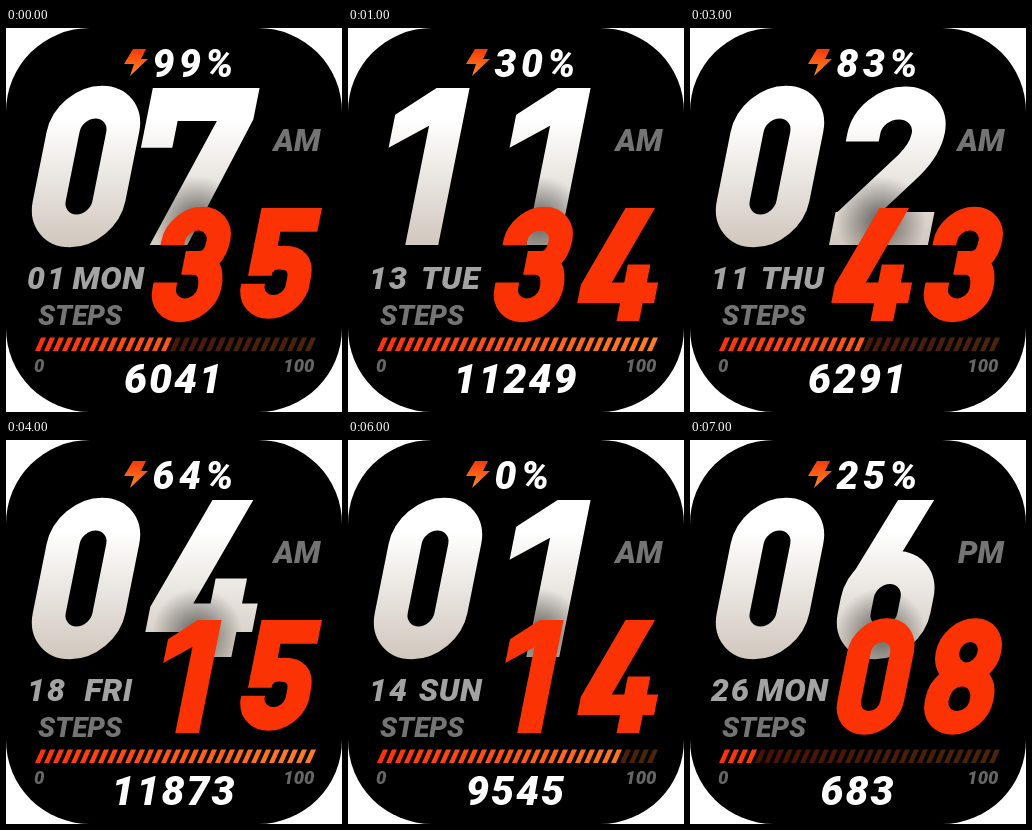
An HTML page that plays this animation: 336x384 px, repeating every 8 s.

```html
<!DOCTYPE html>
<html lang="en">
<head>
<meta charset="utf-8">
<title>Watch face</title>
<style>
  html, body { margin: 0; width: 100%; height: 100%; overflow: hidden; background: #fff; }
  svg { display: block; }
  text { font: italic 900 32px Roboto, "Open Sans", sans-serif; fill: #fff; }
  .mid { text-anchor: middle; }
  .date { fill: #a3a3a3; }
  .label { fill: #747474; }
  .scale { font-size: 18.5px; fill: #666; }
</style>
</head>
<body>
<svg width="336" height="384" viewBox="0 0 336 384">
  <defs>
    <linearGradient id="ivory" gradientUnits="userSpaceOnUse" x1="0" y1="0" x2="0" y2="100">
      <stop offset=".2" stop-color="#fff"/><stop offset="1" stop-color="#d1c8be"/>
    </linearGradient>
    <linearGradient id="flame" x1="0" y1="0" x2="0" y2="1">
      <stop offset="0" stop-color="#f5380c"/><stop offset="1" stop-color="#ff8a24"/>
    </linearGradient>
    <radialGradient id="shade">
      <stop offset=".2" stop-opacity=".45"/><stop offset="1" stop-opacity="0"/>
    </radialGradient>
  </defs>
  <rect width="336" height="384" rx="84"/>
  <path d="M127 21H140L135 31H142L124 48L128 36H118Z" fill="url(#flame)"/>
  <text id="battery" x="146.5" y="48.5" style="font-size:39px;letter-spacing:4.5px"></text>
  <g id="hours"></g>
  <circle cx="191" cy="193" r="45" fill="url(#shade)"/>
  <g id="minutes"></g>
  <text id="half" class="label mid" x="291" y="123" style="font-size:31px"></text>
  <text id="day" class="date" x="21" y="260.5" style="letter-spacing:2px"></text>
  <text id="weekday" class="date mid" x="102.5" y="260.5" style="letter-spacing:.5px"></text>
  <text class="label" x="32" y="296.5" style="font-size:28px">STEPS</text>
  <g id="bar"></g>
  <text class="scale" x="28" y="344">0</text>
  <text class="scale" x="308.5" y="344" text-anchor="end">100</text>
  <text id="steps" class="mid" x="168" y="364.5" style="font-size:41px;letter-spacing:2px"></text>
</svg>
<script>
const $ = id => document.getElementById(id);

// Upright digits, 100 units tall: [stroked centre line, filled part]
const DIGITS = {
  0: ["M10.5 28A19 19 0 0 1 48.5 28V72A19 19 0 0 1 10.5 72Z", ""],
  1: ["", "M25 0H46V100H25V24L2 38V17Z"],
  2: ["M8 34V29A20.5 19.5 0 0 1 49 29Q49 39 41 49L9 86M0 89.5H63", ""],
  3: ["M9 33V29A20 19.5 0 0 1 49 29Q49 48.5 33 48.5H22M33 48.5Q49.5 50 49.5 71A20 19.5 0 0 1 9.5 71V66", ""],
  4: ["", "M23 0H49L24 66H35V50H55V66H65V84H55V100H35V84H-3V68Z"],
  5: ["M57 10.5H14V60M15 56Q16 44 30 44Q49 44 49 62V71A20 19.5 0 0 1 9.5 71V67", ""],
  6: ["M10.5 62A19 19 0 0 1 48.5 62V72A19 19 0 0 1 10.5 72Z", "M24 0H47L28 46L1 62Q1 55 5 46Z"],
  7: ["", "M-15 0H53V20L27 100H3L30 21H5V38H-15Z"],
  8: ["M11 28A18.5 19 0 0 1 48 28A18.5 20 0 0 1 11 28ZM10 69A19.7 20.5 0 0 1 49.5 69V72A19.7 19 0 0 1 10 72Z", ""],
};

const STATES = [
  { battery: 99, time: "0735", half: "AM", day: "01", weekday: "MON", steps: 6041, ticks: 15 },
  { battery: 30, time: "1134", half: "AM", day: "13", weekday: "TUE", steps: 11249, ticks: 31 },
  { battery: 57, time: "0821", half: "AM", day: "24", weekday: "WED", steps: 8326, ticks: 22 },
  { battery: 83, time: "0243", half: "AM", day: "11", weekday: "THU", steps: 6291, ticks: 16 },
  { battery: 64, time: "0415", half: "AM", day: "18", weekday: "FRI", steps: 11873, ticks: 31 },
  { battery: 30, time: "0505", half: "AM", day: "22", weekday: "SAT", steps: 4177, ticks: 11 },
  { battery: 0, time: "0114", half: "AM", day: "14", weekday: "SUN", steps: 9545, ticks: 27 },
  { battery: 25, time: "0608", half: "PM", day: "26", weekday: "MON", steps: 683, ticks: 4 },
];
const HOLD = 1000;
const TICKS = 31;

function bigDigits(text, x, baseline, pitch, scale, paint) {
  return [...text].map((digit, i) => {
    const [line, solid] = DIGITS[digit];
    return `<g transform="translate(${x + i * pitch} ${baseline}) scale(${scale}) skewX(-11.3) translate(0 -100)">
      <path d="${line}" fill="none" stroke="${paint}" stroke-width="21"/>
      <path d="${solid}" fill="${paint}"/></g>`;
  }).join("");
}

function progressBar(lit) {
  return Array.from({ length: TICKS }, (_, i) => {
    const k = i / (TICKS - 1);
    const color = `rgb(255 ${50 + 75 * k} ${15 + 25 * k})`;
    return `<path d="M${29 + i * 9} 323l6 -13.5h5l-6 13.5z" fill="${color}" opacity="${i < lit ? 1 : 0.29}"/>`;
  }).join("");
}

function show(state) {
  for (const id of ["half", "day", "weekday", "steps"]) $(id).textContent = state[id];
  $("battery").textContent = state.battery + "%";
  $("hours").innerHTML = bigDigits(state.time.slice(0, 2), 18, 217, 121, 1.57, "url(#ivory)");
  $("minutes").innerHTML = bigDigits(state.time.slice(2), 141, 293, 88, 1.13, "#fb3204");
  $("bar").innerHTML = progressBar(state.ticks);
}

const start = performance.now();
let shown = -1;
function tick() {
  const index = Math.floor((performance.now() - start) / HOLD) % STATES.length;
  if (index !== shown) show(STATES[shown = index]);
  requestAnimationFrame(tick);
}
tick();
</script>
</body>
</html>
```
